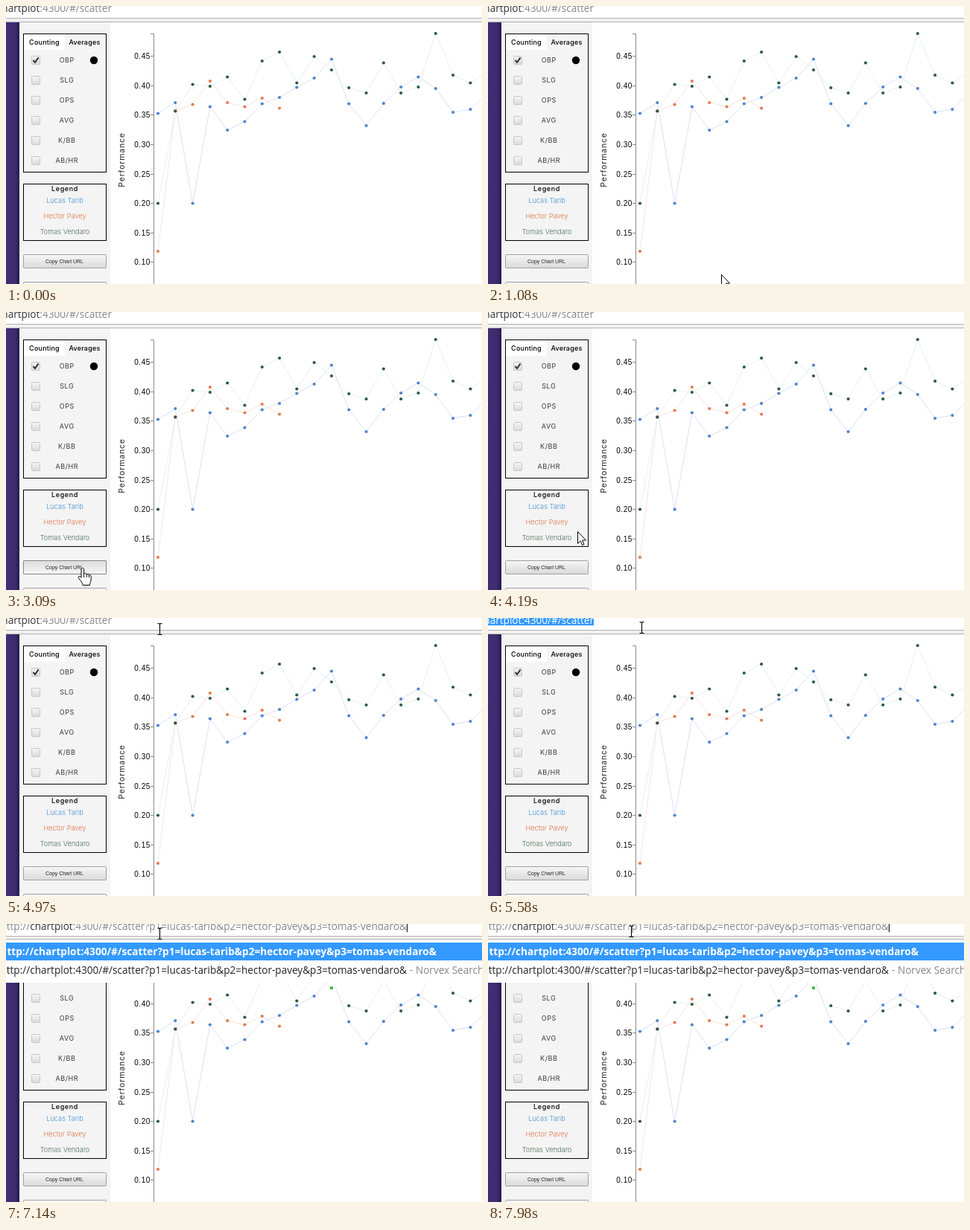
An HTML page that plays this animation: 639x374 px, repeating every 8000 ms.

```html
<!DOCTYPE html>
<html lang="en">
<head>
<meta charset="utf-8">
<title>Scatter chart</title>
<style>
html, body { margin: 0; width: 100%; height: 100%; overflow: hidden; background: #fff; }
svg { display: block; width: 639px; height: 374px; }
text { white-space: pre; }
.ui { font-family: Inter, sans-serif; font-size: 9px; text-anchor: middle; }
.wide { letter-spacing: .6px; }
.names { font-size: 9.2px; font-weight: 300; }
.axis { font-size: 10.6px; letter-spacing: .8px; fill: #222; }
.url { font-family: "Open Sans", sans-serif; font-size: 13.58px; text-anchor: end; fill: #858585; }
.url .host { fill: #333; }
.url .bold { font-size: 13.63px; font-weight: 700; fill: #fff; }
.tick { font-family: "Liberation Sans", Arial, sans-serif; font-size: 10px; letter-spacing: .6px; text-anchor: end; fill: #000; }
.btn { font-family: "Liberation Sans", Arial, sans-serif; font-size: 6.95px; text-anchor: middle; fill: #222; }
.frame { fill: none; stroke: #000; }

/* every change is a hard cut on one 8 s clock */
.step { animation: 8s step-end infinite; }
.hover { animation-name: hover; }
.press { animation-name: press; }
.rest { animation-name: rest; }
.focus { animation-name: focus; }
.picked { animation-name: picked; }
.pasted { animation-name: pasted; }
.move { animation-name: move; }
.arrow { animation-name: arrow; }
.hand { animation-name: hover; }
.beam { animation-name: beam; }

@keyframes hover { 0% { opacity: 0 } 17.25% { opacity: 1 } 52.375%, 100% { opacity: 0 } }
@keyframes press { 0% { opacity: 0 } 38.625% { opacity: 1 } 40.5%, 100% { opacity: 0 } }
@keyframes rest { 0% { opacity: 1 } 68.75%, 100% { opacity: 0 } }
@keyframes focus { 0% { opacity: 0 } 68.75% { opacity: 1 } 69.75%, 100% { opacity: 0 } }
@keyframes picked { 0% { opacity: 0 } 69.75% { opacity: 1 } 77.625%, 100% { opacity: 0 } }
@keyframes pasted { 0% { opacity: 0 } 89.25%, 100% { opacity: 1 } }
@keyframes arrow {
  0% { opacity: 0 } 7.75% { opacity: 1 } 17.25% { opacity: 0 }
  52.375% { opacity: 1 } 60%, 100% { opacity: 0 }
}
@keyframes beam { 0% { opacity: 0 } 60%, 100% { opacity: 1 } }
@keyframes move {
  0% { transform: translate(350px, 380px) }
  7.75% { transform: translate(350px, 364px) }
  8.75% { transform: translate(317px, 360px) }
  12.875% { transform: translate(313px, 361px) }
  13.75% { transform: translate(296px, 363px) }
  14.625% { transform: translate(262px, 364px) }
  15.5% { transform: translate(215px, 362px) }
  16.375% { transform: translate(166px, 358px) }
  17.25% { transform: translate(130px, 351px) }
  18.25% { transform: translate(110px, 346px) }
  19.125% { transform: translate(102px, 344px) }
  52.375% { transform: translate(120px, 295px) }
  53.375% { transform: translate(172px, 140px) }
  54.25% { transform: translate(204px, 37px) }
  57.125% { transform: translate(204px, 34px) }
  58.125% { transform: translate(204px, 28px) }
  59.125% { transform: translate(204px, 21px) }
  60% { transform: translate(206px, 17px) }
  61% { transform: translate(206px, 16px) }
  62.125% { transform: translate(206px, 15px) }
  63% { transform: translate(206px, 14px) }
  63.875% { transform: translate(206px, 13px) }
  97.125% { transform: translate(203px, 13px) }
  98% { transform: translate(198px, 12px) }
  98.875% { transform: translate(194px, 11px) }
  99.75%, 100% { transform: translate(192px, 10px) }
}
</style>
</head>
<body>
<svg viewBox="0 0 639 374">
  <defs>
    <linearGradient id="side">
      <stop offset="0" stop-color="#412f76"/><stop offset=".65" stop-color="#3e2c71"/><stop offset="1" stop-color="#281b4c"/>
    </linearGradient>
    <linearGradient id="up" x2="0" y2="1"><stop stop-color="#f6f6f6"/><stop offset="1" stop-color="#dadada"/></linearGradient>
    <linearGradient id="over" x2="0" y2="1"><stop stop-color="#f0f0f0"/><stop offset="1" stop-color="#cbcbcb"/></linearGradient>
    <linearGradient id="down" x2="0" y2="1"><stop stop-color="#dcdcdc"/><stop offset="1" stop-color="#f6f6f6"/></linearGradient>
  </defs>

  <rect width="639" height="374" fill="#fff"/>
  <rect y="22" width="18" height="352" fill="url(#side)"/>
  <rect x="18" y="22" width="122" height="352" fill="#f4f4f4"/>

  <g id="chart">
    <path d="M194 37.5H198.5V374" fill="none" stroke="#8a8a8a"/>
    <text transform="translate(158.5 207) rotate(-90)" class="ui axis">Performance</text>
  </g>
  <circle class="step pasted" cx="437" cy="86" r="2.1" fill="#3cbf4c"/>

  <g id="panel" class="ui">
    <rect x="24" y="38" width="55" height="21" fill="#fff"/>
    <rect class="frame" x="23.5" y="37.5" width="111" height="186"/>
    <g font-weight="500" letter-spacing=".2">
      <text x="51.5" y="52">Counting</text>
      <text x="105.5" y="52">Averages</text>
    </g>
    <circle cx="118" cy="73" r="5.2"/>
    <rect class="frame" x="23.5" y="239.5" width="111" height="76"/>
    <text class="wide" x="79" y="249.3" font-weight="500">Legend</text>
    <g class="names">
      <text x="79" y="265.3" fill="#3f8fd8">Lucas Tarib</text>
      <text x="79" y="286.3" fill="#dd7347">Hector Pavey</text>
      <text x="79" y="307.3" fill="#4d6d5e">Tomas Vendaro</text>
    </g>
  </g>

  <g stroke="#a0a0a0">
    <rect x="23.5" y="334.5" width="111" height="18" rx="1" fill="url(#up)"/>
    <rect class="step hover" x="23.5" y="334.5" width="111" height="18" rx="1" fill="url(#over)" stroke="#858585"/>
    <rect class="step press" x="23.5" y="334.5" width="111" height="18" rx="1" fill="url(#down)" stroke="#858585"/>
    <rect x="23.5" y="371.5" width="111" height="18" rx="1" fill="url(#up)"/>
  </g>
  <text class="btn" x="78.5" y="346">Copy Chart URL</text>

  <rect y="16" width="639" height="6" fill="#f1f1f1"/>
  <path d="M0 16.5H639M0 21.5H639" stroke="#b0b0b0"/>

  <g class="url">
    <text class="step rest" x="142" y="8"><tspan class="host">chartplot</tspan>:4300/#/scatter</text>
    <g class="step focus">
      <text x="142" y="8" fill="#222">chartplot:4300/#/scatter</text>
      <path d="M141.5 0V10" stroke="#000"/>
    </g>
    <g class="step picked">
      <rect width="142" height="10" fill="#3399ff"/>
      <text x="142" y="8" fill="#fff">chartplot:4300/#/scatter</text>
    </g>
    <g class="step pasted">
      <rect y="20" width="639" height="59" fill="#fff"/>
      <path d="M0 20.5H639" stroke="#b0b0b0"/>
      <rect y="25" width="639" height="24" fill="#3399ff"/>
      <text x="538" y="8">ttp://<tspan class="host">chartplot</tspan>:4300/#/scatter?p1=lucas-tarib&amp;p2=hector-pavey&amp;p3=tomas-vendaro&amp;</text>
      <path d="M538.5 0V11" stroke="#000"/>
      <text class="bold" x="578" y="42">ttp://chartplot:4300/#/scatter?p1=lucas-tarib&amp;p2=hector-pavey&amp;p3=tomas-vendaro&amp;</text>
      <text x="538" y="67" fill="#222">ttp://chartplot:4300/#/scatter?p1=lucas-tarib&amp;p2=hector-pavey&amp;p3=tomas-vendaro&amp;</text>
      <text x="542" y="67" style="text-anchor:start">- Norvex Search</text>
    </g>
  </g>

  <g class="step move">
    <path class="step arrow" d="M.5 .5V16.5L4.2 13 6.6 18.6 9 17.6 6.6 12.1H11.5Z" fill="#fff" stroke="#000"/>
    <path class="step hand" d="M-1 2C-1 0 2.6 0 2.6 2V8.5C3.4 7.2 6 7.4 6.2 9.2 7 8 9.2 8.4 9.4 10.2 10.4 9.2 12.2 10 12.2 11.8V16C12.2 19 10.4 20 10.4 23.5H1.2C1.2 20.5-2.4 17.5-4.6 13.6-5.6 11.6-3 10.4-1 13.4ZM2.6 8.5V13M6.2 9.2V13M9.4 10.2V13.4" fill="#fff" stroke="#000" stroke-linejoin="round"/>
    <path class="step beam" d="M-2.5-7.5H-.5L.5-6.5 1.5-7.5H3.5M.5-6.5V6.5M-2.5 7.5H-.5L.5 6.5 1.5 7.5H3.5" fill="none" stroke="#000" stroke-width="1.1"/>
  </g>
</svg>

<script>
const add = (parent, tag, attrs, text) => {
  const el = document.createElementNS('http://www.w3.org/2000/svg', tag);
  for (const k in attrs) el.setAttribute(k, attrs[k]);
  if (text) el.textContent = text;
  parent.append(el);
  return el;
};
const chart = document.getElementById('chart');
const panel = document.getElementById('panel');

for (let i = 0; i < 8; i++) {
  const y = 67.8 + i * 39.55;
  add(chart, 'path', { d: `M194 ${Math.floor(y) + .5}H198`, stroke: '#8a8a8a' });
  add(chart, 'text', { class: 'tick', x: 194, y: y + 3.5 }, (0.45 - i * 0.05).toFixed(2));
}

const series = [
  { dot: '#4f84cc', line: '#dbe1fa', ys: [144.5, 130, 265.5, 135.5, 167, 155.5, 131.5, 123, 109.5, 97, 71.5, 131.5, 161, 131, 109, 95.5, 111, 143, 139, 116] },
  { dot: '#e07c50', line: '#fae4dc', ys: [330, 141, 132.5, 101, 130, 135.5, 124, 137.5] },
  { dot: '#2d5846', line: '#e9f1ee', ys: [265.5, 141.5, 105.5, 108, 95.5, 125.5, 74, 62, 103.5, 68, 86, 110, 117, 76.5, 117, 109, 37, 93, 103.5, 88] }
];
const px = i => 204 + i * 23.3;
for (const s of series)
  add(chart, 'polyline', { points: s.ys.map((y, i) => `${px(i)},${y}`).join(' '), fill: 'none', stroke: s.line });
for (const s of series)
  s.ys.forEach((y, i) => add(chart, 'circle', { cx: px(i), cy: y, r: 2.1, fill: s.dot }));

['OBP', 'SLG', 'OPS', 'AVG', 'K/BB', 'AB/HR'].forEach((name, i) => {
  const y = 73 + i * 27;
  add(panel, 'rect', { x: 34.5, y: y - 5.5, width: 11, height: 11, rx: 1, fill: 'url(#up)', stroke: '#c6c6c6' });
  add(panel, 'text', { class: 'wide', x: 81.8, y: y + 3.3, fill: '#3a3a3a' }, name);
});
add(panel, 'path', { d: 'M36.5 73L39 75.8 43.6 69.3', fill: 'none', stroke: '#333', 'stroke-width': 2 });
</script>
</body>
</html>
```
